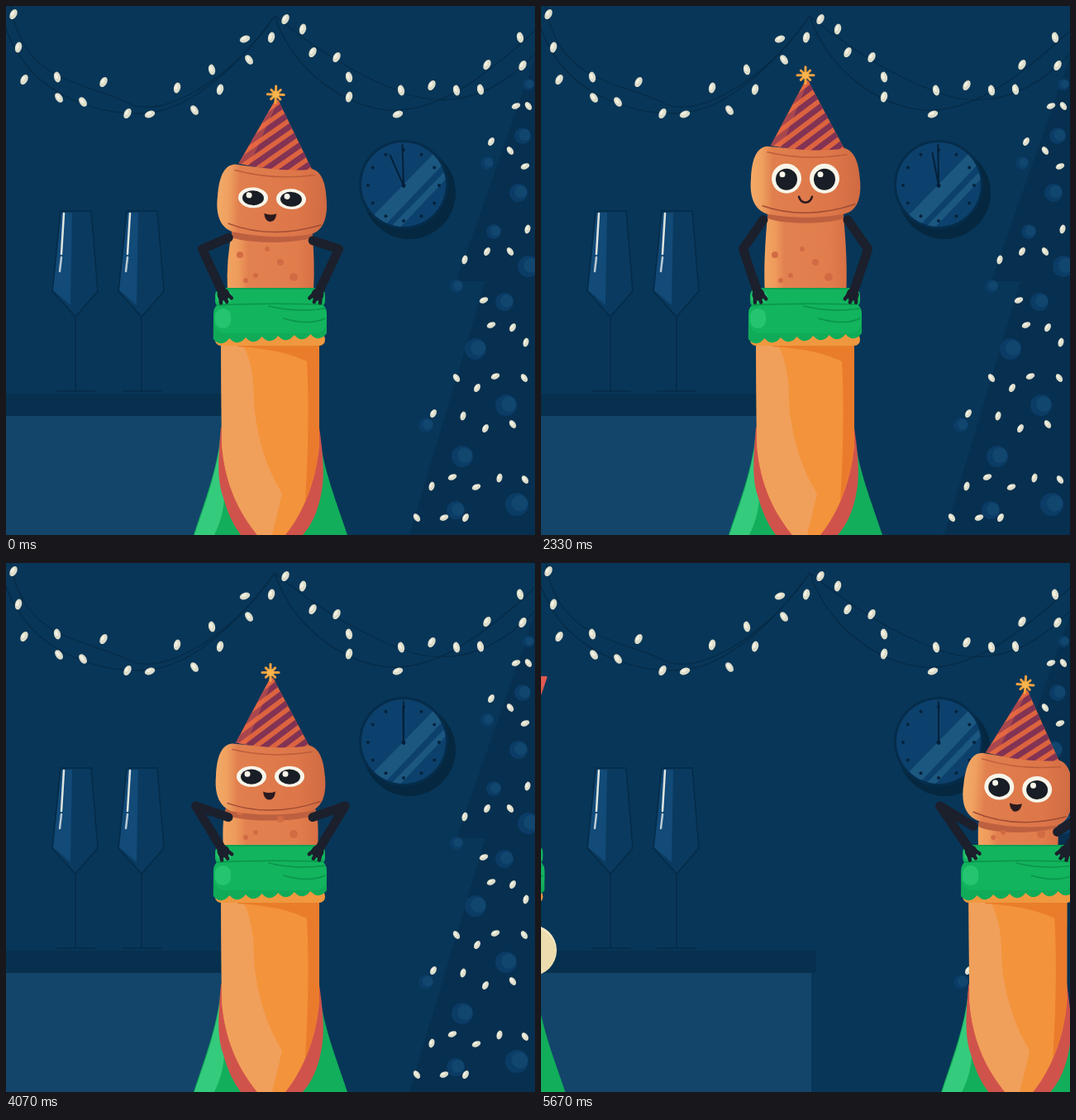
An HTML page with a canvas for the animation above (5.74 s loop, 640 by 640 pixels).

```html
<!DOCTYPE html>
<html lang="en">
<head>
<meta charset="utf-8">
<title>Happy New Year</title>
<style>
html, body { margin: 0; height: 100%; overflow: hidden; background: #083658; }
canvas { display: block; width: 100vw; height: 100vh; }
</style>
</head>
<body>
<canvas id="stage" width="640" height="640"></canvas>
<script>
const c = document.getElementById('stage').getContext('2d');
const LOOP = 5740, POP = 4200;
const TAU = Math.PI * 2;
const clamp = v => Math.max(0, Math.min(1, v));
const mix = (a, b, k) => a + (b - a) * k;
const easeOut = k => 1 - (1 - clamp(k)) ** 3;

function fill(d, color) {
  c.fillStyle = color;
  c.fill(new Path2D(d));
}
function line(d, color, width) {
  c.strokeStyle = color;
  c.lineWidth = width;
  c.stroke(new Path2D(d));
}
function oval(x, y, rx, color, ry = rx, turn = 0) {
  c.fillStyle = color;
  c.beginPath();
  c.ellipse(x, y, Math.max(0, rx), Math.max(0, ry), turn, 0, TAU);
  c.fill();
}
function box(x, y, w, h, r, color) {
  c.fillStyle = color;
  c.beginPath();
  c.roundRect(x, y, w, h, r);
  c.fill();
}
function within(d, draw) {
  c.save();
  c.clip(new Path2D(d));
  draw();
  c.restore();
}
function across(x0, x1, ...stops) {
  const g = c.createLinearGradient(x0, 0, x1, 0);
  stops.forEach(([at, color]) => g.addColorStop(at, color));
  return g;
}

// ---- room ----
const garland = [
  [9, 10], [15, 50], [22, 89], [62, 86], [64, 111], [93, 116], [118, 92], [147, 130],
  [174, 131], [207, 99], [228, 126], [249, 77], [259, 101], [289, 40], [294, 65],
  [321, 38], [338, 16], [359, 28], [371, 56], [400, 62], [415, 86], [415, 110],
  [478, 102], [474, 131], [515, 96], [545, 102], [574, 101], [582, 71], [622, 38], [625, 72]
];
const treeLights = [
  [617, 121], [632, 121], [587, 164], [610, 175], [628, 194], [631, 270], [555, 307],
  [582, 297], [610, 297], [578, 356], [587, 386], [613, 389], [629, 407], [545, 450],
  [570, 462], [592, 448], [627, 450], [517, 493], [553, 496], [580, 511], [613, 506],
  [515, 581], [540, 570], [569, 582], [597, 571], [628, 573], [497, 619], [530, 619], [556, 619]
];
const baubles = [
  [632, 95, 7], [625, 157, 10], [582, 190, 8], [620, 226, 11], [590, 273, 9],
  [632, 315, 13], [545, 339, 8], [603, 358, 11], [568, 415, 13], [605, 483, 13],
  [508, 507, 9], [552, 545, 13], [544, 610, 11], [618, 603, 14]
];

function lights(list, size) {
  list.forEach(([x, y], i) => {
    const turn = [-0.2, 0.25, 1.2, -0.6, 0.5][(i + x) % 5];
    oval(x, y, size * 0.62, '#dcdccb', size, turn);
    oval(x - 1, y - 1, size * 0.25, '#f3f2e2', size * 0.5, turn);
  });
}

function glass(x) {
  c.save();
  c.translate(x, 0);
  fill('M-18 249H19L27 344L0 376L-28 344Z', '#0a3a5f');
  fill('M-17 250H-4L-6 362L-27 344Z', '#124a78');
  line('M-18 248H19L27 345L0 376L-28 345ZM0 376V465M-23 466H24', '#052b48', 1.5);
  line('M-14 251L-17 300', '#dfe5df', 2.5);
  line('M-17 304L-19 321', '#b8c9d3', 2.5);
  c.restore();
}

function hand(angle, length) {
  c.save();
  c.rotate(angle);
  line(`M0 2V${-length}`, '#04213a', 2);
  c.restore();
}

function clock(t) {
  oval(488, 226, 56, '#052840');
  oval(481, 216, 54, '#052d4b');
  oval(481, 216, 51, '#0d416d');
  c.save();
  c.beginPath();
  c.arc(481, 216, 51, 0, TAU);
  c.clip();
  fill('M442 256L518 178L530 190L454 270Z', '#1c5780');
  fill('M461 272L537 194L541 200L467 278Z', '#1c5780');
  c.restore();
  for (let i = 0; i < 12; i++) {
    const a = i / 12 * TAU;
    oval(481 + 43 * Math.sin(a), 217 - 43 * Math.cos(a), 2, '#05233c');
  }
  c.save();
  c.translate(481, 217);
  const left = 1 - clamp(t / POP);
  hand(-0.42 * left, 40);
  hand(-0.03 * left, 49);
  oval(0, 0, 2.5, '#04213a');
  c.restore();
}

function room(t) {
  c.fillStyle = '#083658';
  c.fillRect(0, 0, 640, 640);
  fill('M0 496H327V640H0Z', '#13456b');
  fill('M0 469H333V496H0Z', '#06304e');
  glass(84);
  glass(164);

  fill('M640 62L545 333H580L488 640H640Z', '#072f4f');
  for (const [x, y, r] of baubles) {
    oval(x, y, r, '#0b3c66');
    oval(x + r * 0.25, y - r * 0.1, r * 0.7, '#11466f');
  }
  lights(treeLights, 5.5);

  line('M0 28C30 112 120 135 174 129S285 68 325 12M6 0C20 95 100 92 147 117S285 75 325 12' +
    'M325 12C350 85 420 128 474 126S580 85 640 30M325 12C375 52 420 82 478 104S590 110 640 58',
    '#052b47', 1.3);
  lights(garland, 6.5);
  clock(t);
}

// ---- bottle ----
let scallop = 'M251 372H388V396';
for (let i = 0; i < 7; i++) scallop += 'q-9.8 12 -19.6 1';
scallop += 'Z';

function bottle() {
  fill('M260 515C256 560 240 600 227 640H413C400 600 383 560 379 515Z', '#12ae5b');
  fill('M258 535C252 575 238 610 228 640H252C262 620 266 600 264 570Z', '#35cb7d');
  fill('M260 510C257 545 255 570 262 592Q270 622 284 640H359Q375 622 381 592C386 570 384 545 379 510Z', '#d0534b');

  const foil = 'M260 404H379V530C375 580 356 618 338 640H304C284 615 265 582 261 530Z';
  fill(foil, '#f3933b');
  within(foil, () => {
    fill('M260 404H283Q301 430 300 482Q306 545 334 590L322 640H260Z', '#f0a05b');
    fill('M360 404H380V560L362 600Q368 500 364 430Z', '#eb7b2c');
    fill('M280 404H380V440Q350 416 280 412Z', '#e97d2b');
  });

  box(253, 396, 133, 15, 7, '#f0983f');
  fill(scallop, '#10ab58');
  box(253, 341, 133, 25, 9, '#12b45e');
  box(251, 358, 137, 38, 14, '#12b45e');
  box(254, 344, 20, 16, 8, '#24c470');
  box(253, 366, 19, 24, 9, '#24c470');
  line('M256 362Q300 359 384 361M318 363Q350 371 386 366M336 378Q366 387 386 378', '#0a944b', 1.5);
  line('M262 342H378', '#0c9d50', 1.5);
}

// ---- cork: time, x, y, tilt in degrees, half width, lid, arms loose, wave ----
const poses = [
  [-70, 320, 272, 4, 48, 0.35, 0, 0],
  [0, 322, 232, 2, 52, 0.95, 0, 0],
  [200, 320, 226, 0, 51, 0, 0, 0],
  [560, 320, 236, 0, 56, 0, 0, 0],
  [760, 320, 232, 0, 58, 0, 1, 0],
  [1000, 320, 232, 0, 58, 0, 1, 0],
  [1300, 320, 238, 0, 57, 0, 0, 0],
  [1700, 320, 250, 0, 59, 0.8, 0, 0],
  [2050, 320, 208, 0, 49, 0, 0, 0],
  [2950, 320, 211, 0, 50, 0, 0, 0],
  [3250, 328, 213, 10, 55, 0, 0, 1],
  [3620, 328, 213, 10, 55, 0, 0, 1],
  [3850, 320, 216, 0, 52, 0, 0, 0],
  [4050, 320, 264, 0, 58, 1, 0, 0],
  [4170, 320, 185, 0, 47, 0, 0, 0],
  [4330, 320, -300, 0, 46, 0, 1, 0]
];

function poseAt(t) {
  const i = poses.findIndex(p => p[0] > t);
  if (i < 1) return poses[i ? poses.length - 1 : 0];
  const a = poses[i - 1], b = poses[i];
  const k = (t - a[0]) / (b[0] - a[0]), s = k * k * (3 - 2 * k);
  return a.map((v, n) => mix(v, b[n], s));
}

function corkBody(x, y, half) {
  const end = Math.min(346, y + 165), top = y + 38;
  const d = `M${x - half + 4} ${top}Q${320 - half - 2} ${end - 40} ${320 - half} ${end}` +
    `H${320 + half}Q${320 + half + 2} ${end - 40} ${x + half - 4} ${top}Z`;
  fill(d, across(320 - half, 320 + half, [0, '#f2a461'], [0.13, '#ee9a5c'], [0.24, '#e28150'], [0.8, '#e17d4c'], [1, '#d87145']));
  within(d, () => {
    oval(x, y + 42, half + 5, '#bd6040', 12);
    [[-37, 45, 4], [12, 36, 4], [28, 18, 5], [-18, 20, 3], [-4, 52, 3], [-30, 14, 3]]
      .forEach(([dx, up, r]) => oval(320 + dx, end - up, r, '#d26b44'));
  });
}

function arm(sx, sy, ex, ey, hx, hy) {
  const color = '#1b202c';
  line(`M${sx} ${sy}L${ex} ${ey}L${hx} ${hy}`, color, 11);
  c.save();
  c.translate(hx, hy);
  c.rotate(Math.atan2(hy - ey, hx - ex) - Math.PI / 2);
  oval(0, 0, 7.5, color);
  line('M-5 2L-7 8M0 2V10M5 2L7 8', color, 4.5);
  c.restore();
}

function arms(t, [, x, y, tilt, , , loose, wave]) {
  const a = tilt * Math.PI / 180;
  for (const side of [-1, 1]) {
    const dx = side * 51, dy = mix(50, 40, loose);
    const sx = x + dx * Math.cos(a) - dy * Math.sin(a);
    const sy = y + dx * Math.sin(a) + dy * Math.cos(a);
    let ex = mix(76 + (y - 210) * 0.3, 87, loose), ey = mix(294, y + 32, loose);
    let hx = mix(57, 84, loose), hy = mix(349, y + 89, loose);
    if (side < 0) {
      const swing = -0.34 + Math.sin((t - 3400) / 85) * 0.35;
      ex = mix(ex, 97, wave);
      ey = mix(ey, 219, wave);
      hx = mix(hx, 97 - 54 * Math.sin(swing), wave);
      hy = mix(hy, 219 - 54 * Math.cos(swing), wave);
    }
    arm(sx, sy, 320 + side * ex, ey, 320 + side * hx, hy);
  }
}

function hat() {
  const cone = 'M-42 -40L0 -119Q4 -120 6 -113L47 -36Q2 -31 -42 -40Z';
  fill(cone, '#dc633f');
  within(cone, () => {
    for (let i = 0; i < 9; i++) line(`M-60 ${-92 + i * 16}L65 ${-186 + i * 16}`, '#823353', 7);
    fill('M-45 -38L0 -122L4 -120L-30 -36Z', 'rgba(240,110,70,.35)');
  });
  for (let i = 0; i < 8; i++) {
    const a = i / 8 * TAU, r = i % 2 ? 8 : 10;
    line(`M0 -125L${r * Math.sin(a)} ${-125 - r * Math.cos(a)}`, '#f5a23f', 3);
  }
  oval(0, -125, 4, '#f8b44d');
}

function head([, x, y, tilt, , lid]) {
  c.save();
  c.translate(x, y);
  c.rotate(tilt * Math.PI / 180);
  const d = 'M-46 -39Q0 -33 46 -37C62 -34 65 -12 66 2C68 24 62 40 46 43Q0 51 -46 43C-62 38 -68 22 -66 0C-65 -22 -60 -38 -46 -39Z';
  fill(d, across(-66, 66, [0, '#f3aa66'], [0.1, '#efa060'], [0.2, '#e17f4e'], [0.75, '#dd7649'], [1, '#d06a42']));
  line('M-46 -32Q0 -21 50 -29', '#bd5d3b', 1.5);
  line('M-52 33Q0 51 60 31', '#a04c34', 1.5);
  hat();
  for (const ex of [-23, 23]) {
    const drop = lid * 5, tall = 1 - lid * 0.33;
    oval(ex, drop * 0.15, 18, '#f8f5e9', 18 * tall);
    oval(ex, 1, 13, '#191d25', 13 * tall);
    oval(ex - 5, -5 + drop * 0.6, 3.5, '#f8f5e9');
  }
  if (lid > 0.2) fill('M-9 19Q-2 22 6 19Q5 29 -2 29Q-8 28 -9 19Z', '#2a1a1f');
  else line('M-8 22Q-6 29 0 29Q6 29 8 22', '#2a1a1f', 2.5);
  c.restore();
}

// ---- foam, lettering and sparkles ----
// Each blob: place and radius soon after the pop, then later while dripping.
const foam = [
  [268, 337, 26, 275, 420, 8], [262, 383, 25, 275, 450, 10], [250, 412, 27, 262, 471, 26],
  [257, 450, 28, 264, 530, 10], [376, 344, 33, 360, 430, 10], [385, 380, 34, 360, 450, 12],
  [404, 401, 31, 382, 447, 31], [379, 456, 37, 374, 512, 20], [330, 346, 13, 330, 400, 4]
];
const drops = [
  [345, 274, 13, 350, 420, 0], [301, 317, 9, 295, 420, 0], [337, 300, 4, 340, 400, 0],
  [292, 223, 5, 278, 286, 2], [329, 223, 5, 354, 297, 2], [297, 245, 5, 291, 311, 3],
  [326, 245, 4, 340, 311, 3]
];

function blobs(list, t) {
  if (t < POP) return;
  const grow = easeOut((t - POP) / 400), fall = Math.max(0, (t - 4600) / 730);
  for (const [x, y, r, x2, y2, r2] of list) {
    const px = mix(320, mix(x, x2, fall), grow), py = mix(350, mix(y, y2, fall), grow);
    const pr = mix(0, mix(r, r2, fall), grow);
    oval(px, py, pr, '#f5e9c3');
    oval(px + pr * 0.04, py + pr * 0.05, pr * 0.93, '#eddcae');
  }
  // Cover the light rims where blobs overlap.
  for (const [x, y, r, x2, y2, r2] of list) {
    const px = mix(320, mix(x, x2, fall), grow), py = mix(350, mix(y, y2, fall), grow);
    oval(px, py, mix(0, mix(r, r2, fall), grow) * 0.9, '#eddcae');
  }
}

function greeting(t) {
  const k = clamp((t - POP - 30) / 270);
  if (!k) return;
  const size = easeOut(k) + 0.12 * Math.sin(k * Math.PI);
  c.save();
  c.translate(318, mix(345, 222, easeOut(k)));
  c.scale(0.64 * size, size); // condensed lettering
  c.font = '700 68px "Noto Sans", sans-serif';
  c.textAlign = 'center';
  c.fillStyle = c.strokeStyle = '#e05a50';
  c.lineWidth = 2;
  ['HAPPY', 'NEW', 'YEAR'].forEach((word, i) => {
    c.fillText(word, 0, -35 + i * 60);
    c.strokeText(word, 0, -35 + i * 60);
  });
  c.restore();
}

// x, y, start, largest radius
const sparkles = [
  [223, 78, 4350, 30], [502, 186, 4550, 24], [85, 493, 4560, 22],
  [361, 72, 5080, 19], [130, 408, 5080, 19]
];
function sparkle([x, y, start, max], t) {
  const k = (t - start) / 500;
  if (k <= 0 || k >= 1) return;
  const r = max * Math.sin(k * Math.PI), q = r * 0.22;
  c.save();
  c.translate(x, y);
  fill(`M0 ${-r}Q${q} ${-q} ${r * 0.85} 0Q${q} ${q} 0 ${r}Q${-q} ${q} ${-r * 0.85} 0Q${-q} ${-q} 0 ${-r}Z`,
    max > 25 ? '#e96d2c' : k < 0.15 && y > 480 ? '#f3d9a8' : '#f7983c');
  c.restore();
}

function bottleAt(shift, t) {
  c.save();
  c.translate(shift, 0);
  blobs(foam, t);
  const pose = poseAt(t), corked = t < 4330;
  if (corked) corkBody(pose[1], pose[2], pose[4]);
  bottle();
  greeting(t);
  blobs(drops, t);
  if (corked) {
    arms(t, pose);
    head(pose);
  }
  c.restore();
}

function draw(now) {
  const t = now % LOOP;
  c.lineCap = c.lineJoin = 'round';
  room(t);
  const pan = t < 4900 ? 0 : Math.min(640, 640 * Math.exp((t - 5726) * 0.0093));
  bottleAt(-pan, t);
  if (pan) bottleAt(641 - pan, t - LOOP);
  sparkles.forEach(s => sparkle(s, t));
  requestAnimationFrame(draw);
}

const begin = performance.now();
requestAnimationFrame(now => draw(Math.max(0, now - begin)));
</script>
</body>
</html>
```
